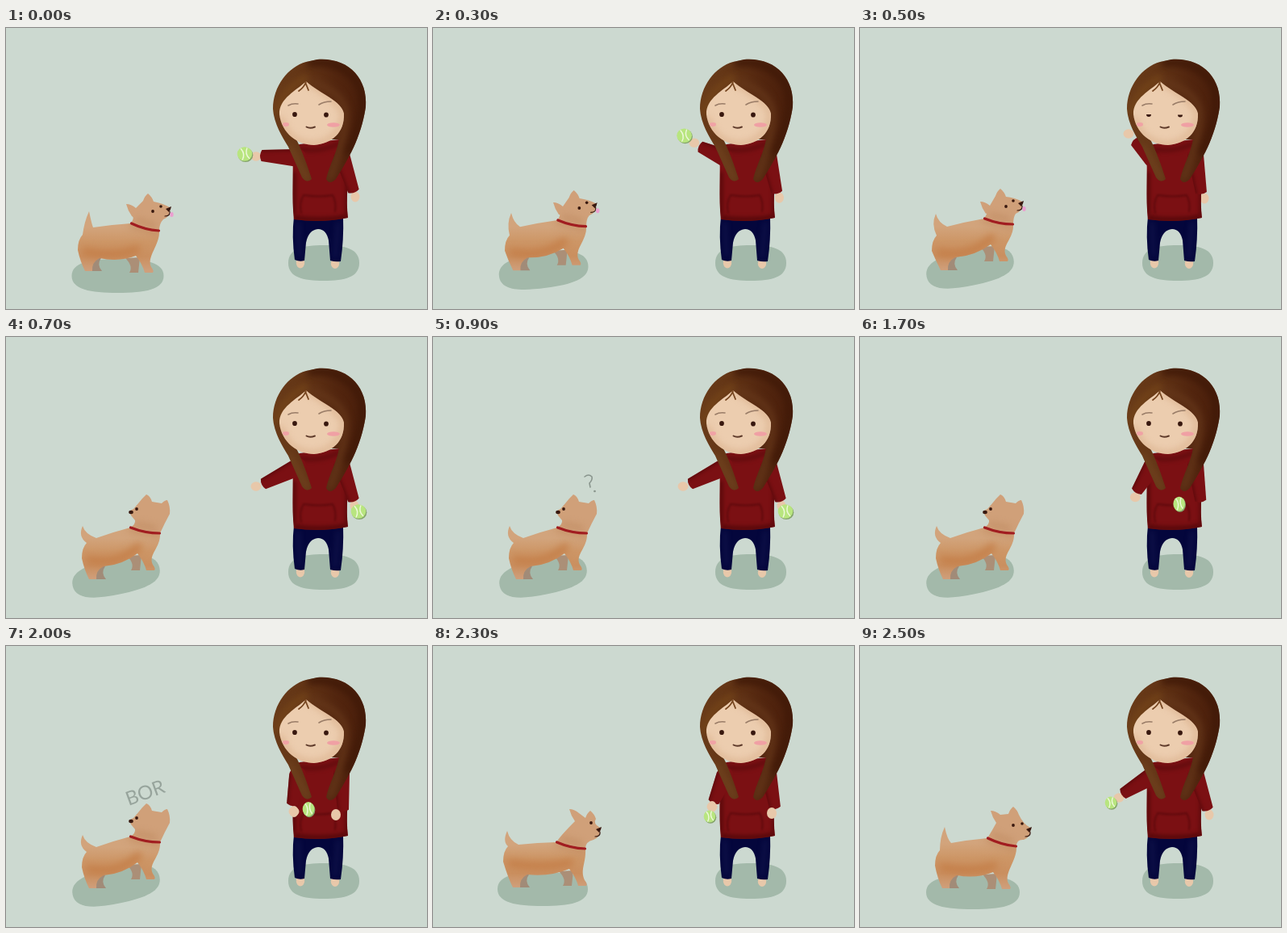
Animation, 522 px wide and 348 px high, one loop 2.6 s. Source, as an HTML page with a canvas:

```html
<!DOCTYPE html>
<html lang="en">
<head>
<meta charset="utf-8">
<title>Fetch</title>
<style>
  html, body { margin: 0; width: 100%; height: 100%; overflow: hidden; background: #ccd9d0; }
  canvas { display: block; }
</style>
</head>
<body>
<canvas id="stage" width="522" height="348"></canvas>
<script>
const ctx = document.getElementById('stage').getContext('2d');
const STEP = 100, STEPS = 26;
const SKIN = '#e8c8aa', RED = '#7b1013', DARK_RED = '#520709', SHADE = '#a3b9aa', INK = '#38180f';

// Dog poses: tail, rump, back, neck, chest, front foot, hind foot, ear, ear, nose, eye, eye
const DOG = {
  up:   [103,227, 89,275, 108,247, 155,242, 190,251, 182,303, 99,301, 149,218, 176,205, 203,224, 182,227, 192,221],
  lean: [94,230, 89,276, 108,246, 154,236, 190,243, 183,289, 101,300, 149,215, 174,199, 201,217, 181,221, 190,214],
  back: [95,234, 94,274, 112,249, 154,236, 191,243, 184,289, 104,300, 174,195, 200,202, 155,217, 162,213, 162,213],
  low:  [92,229, 87,267, 106,246, 153,243, 189,251, 190,297, 100,299, 169,202, 195,204, 207,227, 196,219, 196,219],
  look: [105,224, 93,272, 113,244, 158,238, 194,248, 186,301, 103,300, 162,204, 190,199, 211,227, 190,222, 201,220]
};
// Ground shadow per pose: centre, radii, tilt
const DOG_SHADE = {
  up: [138.5, 307, 57, 21, 0], lean: [136.5, 297, 55, 22, -0.2], back: [136.5, 297, 55, 22, -0.2],
  low: [136, 301, 56, 21, 0], look: [140, 305, 58, 21, 0]
};
const DOG_KEYS = [[0, 'up'], [1, 'up'], [4, 'lean'], [7, 'back'], [22, 'low'], [23, 'low'], [25, 'look'], [26, 'up']];

// Step, left wrist, left hand, right wrist, right hand, ball
const ARM_KEYS = [
  [0,  317,158, 310,159, 431,202, 433,209, 296,156],
  [5,  341,140, 333,131, 423,204, 427,211, 322,118],
  [7,  319,182, 310,185, 431,202, 432,209, 437,216],
  [15, 319,182, 310,185, 431,202, 432,209, 437,216],
  [18, 355,196, 357,205, 418,203, 409,209, 375,202],
  [21, 355,196, 357,205, 418,203, 409,209, 375,202],
  [23, 348,193, 346,199, 424,200, 420,207, 343,211],
  [25, 326,183, 321,188, 431,202, 433,209, 311,194],
  [26, 317,158, 310,159, 431,202, 433,209, 296,156]
];

const mix = (a, b, u) => a.map((v, i) => v + (b[i] - v) * u);

function span(keys, k) {
  let i = 0;
  while (i < keys.length - 2 && keys[i + 1][0] <= k) i++;
  const a = keys[i], b = keys[i + 1];
  return [a, b, Math.min(1, (k - a[0]) / (b[0] - a[0]))];
}

function fill(path, style) {
  ctx.fillStyle = style;
  ctx.fill(path);
}

function line(d, style, width) {
  ctx.strokeStyle = style;
  ctx.lineWidth = width;
  ctx.lineCap = ctx.lineJoin = 'round';
  ctx.stroke(new Path2D(d));
}

function oval(x, y, rx, ry, style, tilt = 0) {
  ctx.beginPath();
  ctx.ellipse(x, y, rx, ry, tilt, 0, Math.PI * 2);
  ctx.fillStyle = style;
  ctx.fill();
}

function grad(x0, y0, x1, y1, ...colors) {
  const g = ctx.createLinearGradient(x0, y0, x1, y1);
  colors.forEach((c, i) => g.addColorStop(i / (colors.length - 1), c));
  return g;
}

// Soft brush strokes kept inside a shape
function brush(path, strokes, blur = 3) {
  ctx.save();
  ctx.clip(path);
  ctx.filter = `blur(${blur}px)`;
  for (const s of strokes) line(...s);
  ctx.restore();
}

// Rounded slab lying on the ground
function ground(x, y, rx, ry, tilt) {
  ctx.save();
  ctx.translate(x, y);
  ctx.rotate(tilt);
  const p = new Path2D(`M${-rx} 0C${-rx} ${-ry * .8} ${-rx * .6} ${-ry} 0 ${-ry}` +
    `S${rx} ${-ry * .8} ${rx} 0S${rx * .6} ${ry} 0 ${ry}S${-rx} ${ry * .8} ${-rx} 0Z`);
  fill(p, SHADE);
  ctx.restore();
}

function sleeve(x0, y0, x1, y1, w0, w1) {
  const a = Math.atan2(y1 - y0, x1 - x0), s = Math.sin(a), c = Math.cos(a);
  const p = new Path2D();
  p.moveTo(x0 - s * w0, y0 + c * w0);
  p.lineTo(x1 - s * w1, y1 + c * w1);
  p.quadraticCurveTo(x1 + c * 4, y1 + s * 4, x1 + s * w1, y1 - c * w1);
  p.lineTo(x0 + s * w0, y0 - c * w0);
  p.arc(x0, y0, w0, a - Math.PI / 2, a + Math.PI / 2, true);
  fill(p, RED);
  brush(p, [[`M${x0 - s * w0} ${y0 + c * w0}L${x1 - s * w1} ${y1 + c * w1}`, DARK_RED, 3]], 2);
}

function ball(x, y, rx, ry) {
  oval(x + 1, y + 1.2, rx, ry, '#84a36b');
  oval(x, y, rx, ry, '#b8e57f');
  ctx.save();
  ctx.translate(x, y);
  line(`M${-rx * .5} ${-ry * .7}Q${rx * .1} 0 ${-rx * .3} ${ry * .8}` +
    `M${rx * .3} ${-ry * .8}Q0 0 ${rx * .6} ${ry * .6}`, '#eef8dc', 1.4);
  ctx.restore();
}

function dogHead(p, facingLeft) {
  const [nx, ny, cx, cy] = p.slice(6, 10);
  const [ax, ay, bx, by, sx, sy, ex, ey, fx, fy] = p.slice(14);
  const d = facingLeft
    ? `M${nx} ${ny}Q${nx + 7} ${ny - 4} ${nx + 6} ${ny - 9}L${sx} ${sy + 4}Q${sx - 3} ${sy - 3} ${sx + 3} ${sy - 4}` +
      `Q${ax - 9} ${ay + 10} ${ax - 5} ${ay + 5}L${ax} ${ay}Q${ax + 5} ${ay + 2} ${ax + 7} ${ay + 9}` +
      `L${bx - 7} ${by + 4}Q${bx - 3} ${by} ${bx} ${by}Q${bx + 4} ${by + 8} ${bx + 3} ${by + 17}` +
      `Q${bx - 3} ${by + 28} ${cx} ${cy}Z`
    : `M${nx} ${ny}Q${nx + 5} ${ny - 8} ${ax + 7} ${ay + 15}Q${ax + 2} ${ay + 8} ${ax} ${ay}` +
      `Q${ax + 6} ${ay} ${ax + 12} ${ay + 5}L${bx - 6} ${by + 9}Q${bx - 4} ${by + 3} ${bx} ${by}` +
      `Q${bx + 5} ${by + 4} ${bx + 7} ${by + 10}Q${sx - 9} ${sy - 7} ${sx} ${sy - 2}` +
      `Q${sx + 1} ${sy + 10} ${sx - 8} ${sy + 13}Q${cx} ${cy - 9} ${cx} ${cy}Z`;
  const head = new Path2D(d);
  fill(head, '#d0a079');
  brush(head, [[`M${nx + 8} ${ny - 4}L${cx - 6} ${cy - 6}`, '#c08c63', 5]], 4);
  oval(ex, ey, 1.9, 2.1, INK);
  if (fx !== ex) oval(fx, fy, 1.8, 1.8, INK);
  if (facingLeft) {
    oval(sx, sy, 2.8, 2.2, INK);
  } else {
    fill(new Path2D(`M${sx - 5} ${sy}L${sx + 2} ${sy - 3}Q${sx + 1} ${sy + 2} ${sx - 1} ${sy + 4}Z`), INK);
    line(`M${sx} ${sy + 3}Q${sx + 1} ${sy + 9} ${sx - 6} ${sy + 9}`, INK, 1.2);
  }
}

function dog(k) {
  const [a, b, u] = span(DOG_KEYS, k);
  const hard = (a[1] === 'back') !== (b[1] === 'back') || b[1] === 'low';
  const t = hard ? 0 : u;
  const name = u === 1 ? b[1] : a[1];
  const p = mix(DOG[a[1]], DOG[b[1]], t);
  const [tx, ty, rx, ry, bx, by, nx, ny, cx, cy, fx, fy, hx, hy] = p;
  ground(...mix(DOG_SHADE[a[1]], DOG_SHADE[b[1]], t));

  // far legs
  fill(new Path2D(`M${hx + 4} ${hy - 18}L${hx + 19} ${hy - 16}Q${hx + 13} ${hy - 8} ${hx + 20} ${hy}L${hx + 8} ${hy}Z`), '#a18b78');
  fill(new Path2D(`M${fx - 34} ${fy - 18}L${fx - 16} ${fy - 19}L${fx - 18} ${fy}L${fx - 29} ${fy}Q${fx - 24} ${fy - 8} ${fx - 34} ${fy - 18}Z`), '#ab8f77');

  const body = new Path2D(
    `M${tx} ${ty}Q${tx + 3} ${by - 5} ${bx} ${by}Q${(bx + nx) / 2} ${(by + ny) / 2 - 1} ${nx} ${ny}L${cx} ${cy}` +
    `C${cx + 1} ${cy + 18} ${fx - 8} ${fy - 20} ${fx - 2} ${fy - 7}Q${fx + 2} ${fy - 2} ${fx} ${fy}L${fx - 10} ${fy}` +
    `Q${fx - 13} ${fy - 11} ${fx - 21} ${fy - 21}Q${(fx + hx) / 2} ${(fy + hy) / 2 - 12} ${hx + 17} ${hy - 16}` +
    `Q${hx + 7} ${hy - 11} ${hx + 8} ${hy}L${hx - 1} ${hy}Q${hx - 7} ${hy - 12} ${rx} ${ry}` +
    `Q${rx} ${ry - 13} ${rx + 6} ${ry - 19}Q${tx - 6} ${ty + 13} ${tx} ${ty}Z`);
  fill(body, grad(0, by, 0, hy, '#d2a47c', '#cd9666', '#ca8f5f', '#cf9f7b'));
  brush(body, [
    [`M${rx + 9} ${ry + 2}Q${(rx + fx) / 2} ${ry + 9} ${fx - 20} ${fy - 29}`, '#c47e48', 9],
    [`M${nx} ${ny + 2}L${cx} ${cy + 3}`, '#bd8357', 4]
  ], 5);

  dogHead(p, name === 'back');
  line(`M${nx + .5} ${ny}Q${(nx + cx) / 2} ${(ny + cy) / 2 + 3.5} ${cx - .5} ${cy}`, '#a11d20', 3.2);
  if (name === 'up' || name === 'lean') oval(p[18] + 2.5, p[19] + 7, 2.2, 3, '#eb9fd0');
}

function face(blink) {
  const path = new Path2D('M372 66C361 77 338 87 339 107C342 131 362 145 382 145C404 143 420 130 419 106C416 90 390 82 372 66Z');
  fill(path, '#eccdaf');
  brush(path, [['M341 112Q350 143 382 144Q417 138 418 104Q405 85 373 67', '#d6a983', 4]], 4);
  line('M372 67Q369 74 363 78M371 67L375 77', '#75451f', 1.8);
  line('M350 96Q355 93 362 94M388 95Q394 91 403 91', '#9a7d68', 1.6);
  for (const [x, y] of [[358, 107], [397, 107.5]]) {
    if (blink) {
      ctx.beginPath();
      ctx.arc(x, y, 3, 0, Math.PI);
      ctx.fillStyle = INK;
      ctx.fill();
    } else oval(x, y, 2.9, 3.1, INK);
  }
  line('M372.5 122.5Q377 125 383 122.5', '#5e3a2a', 1.9);
  ctx.save();
  ctx.filter = 'blur(0.7px)';
  oval(347, 119.5, 4, 2.4, '#f0a2a5');
  oval(406, 120, 8, 2.8, '#f0a0a4');
  ctx.restore();
}

function hair() {
  const path = new Path2D('M372 42C350 48 331 72 331 100C332 118 343 136 350 147L367 185Q373 193 379 187' +
    'C373 168 367 152 360 138L413 138C410 155 401 170 397 187Q401 195 409 187C424 163 440 137 446 98C449 62 424 36 386 39Z');
  fill(path, grad(331, 0, 447, 0, '#693b19', '#633516', '#53260f', '#4a1e0b'));
  brush(path, [
    ['M372 64C395 72 422 82 421 112Q419 140 402 185', '#65371a', 7],
    ['M378 43Q418 38 439 72Q449 102 425 153', '#411a08', 10],
    ['M371 62Q342 78 336 105', '#774719', 6],
    ['M351 147L374 187', '#70421f', 7]
  ], 4);
}

function girl(k) {
  const [a, b, u] = span(ARM_KEYS, k);
  const [, lx, ly, hx, hy, rx, ry, gx, gy, bx, by] = mix(a, b, u);
  ground(394, 291, 44, 22, 0);
  oval(365, 291, 5.2, 6.5, SKIN);
  oval(408, 291.5, 5.2, 6.5, SKIN);
  const pants = new Path2D('M357 234L418 234Q419 262 415 289Q408 290 402 288L400 263Q397 249 387 249Q375 250 372 266L370 288Q364 290 358 287Q354 258 357 234Z');
  fill(pants, '#04063c');
  brush(pants, [['M412 242L408 284M362 242L364 282', '#11154c', 4]], 3);

  oval(gx, gy, 5.5, 6.5, SKIN);
  const torso = new Path2D('M355 153Q358 146 364 144L413 138Q422 143 425 153C425 185 421 212 424 235Q391 242 357 237C354 210 357 180 355 153Z');
  fill(torso, RED);
  brush(torso, [
    ['M358 235Q390 240 423 234', DARK_RED, 5],
    ['M357 180L357 230M424 170L423 230', DARK_RED, 4],
    ['M365 150Q388 155 413 143', '#5d0b0d', 4]
  ], 2.5);
  ctx.save();
  ctx.filter = 'blur(0.8px)';
  line('M369 207Q363 217 366 229M405 207Q410 216 408 227M370 207Q388 210 405 207', '#600a0d', 2);
  ctx.restore();

  oval(hx, hy, 6.5, 5.8, SKIN);
  sleeve(362, 161, lx, ly, 11, 7);
  sleeve(416, 157, rx, ry, 10, 7);
  if (k >= 18 && k < 24) {
    oval(gx, gy, 6, 7, SKIN);
    oval(hx, hy, 5.5, 7, SKIN);
  }
  hair();
  face(k >= 4 && k <= 6);
  if (k < 4 || k >= 7) ball(bx, by, k >= 17 ? 7.3 : 9.3, k >= 17 && k < 22 ? 9 : k >= 22 ? 7.5 : 8.8);
}

function words(k) {
  if (k >= 8 && k <= 12) {
    line('M188 173Q193 169 197 173Q198 177 194 181L195 186', '#89958d', 1.6);
    oval(200.5, 191, 1.4, 1.2, '#89958d');
  }
  if (k >= 18 && k <= 21) {
    ctx.save();
    ctx.translate(152, 198);
    ctx.rotate(-0.35);
    ctx.font = '24px Lato, "Open Sans", sans-serif';
    ctx.fillStyle = '#97a49c';
    ctx.fillText('BOR'.slice(0, k - 17), 0, 0);
    ctx.restore();
  }
}

let shown = -1;
function frame(now) {
  const k = Math.floor(now / STEP) % STEPS;
  if (k !== shown) {
    shown = k;
    ctx.fillStyle = '#ccd9d0';
    ctx.fillRect(0, 0, 522, 348);
    dog(k);
    girl(k);
    words(k);
  }
  requestAnimationFrame(frame);
}
frame(performance.now());
</script>
</body>
</html>
```
